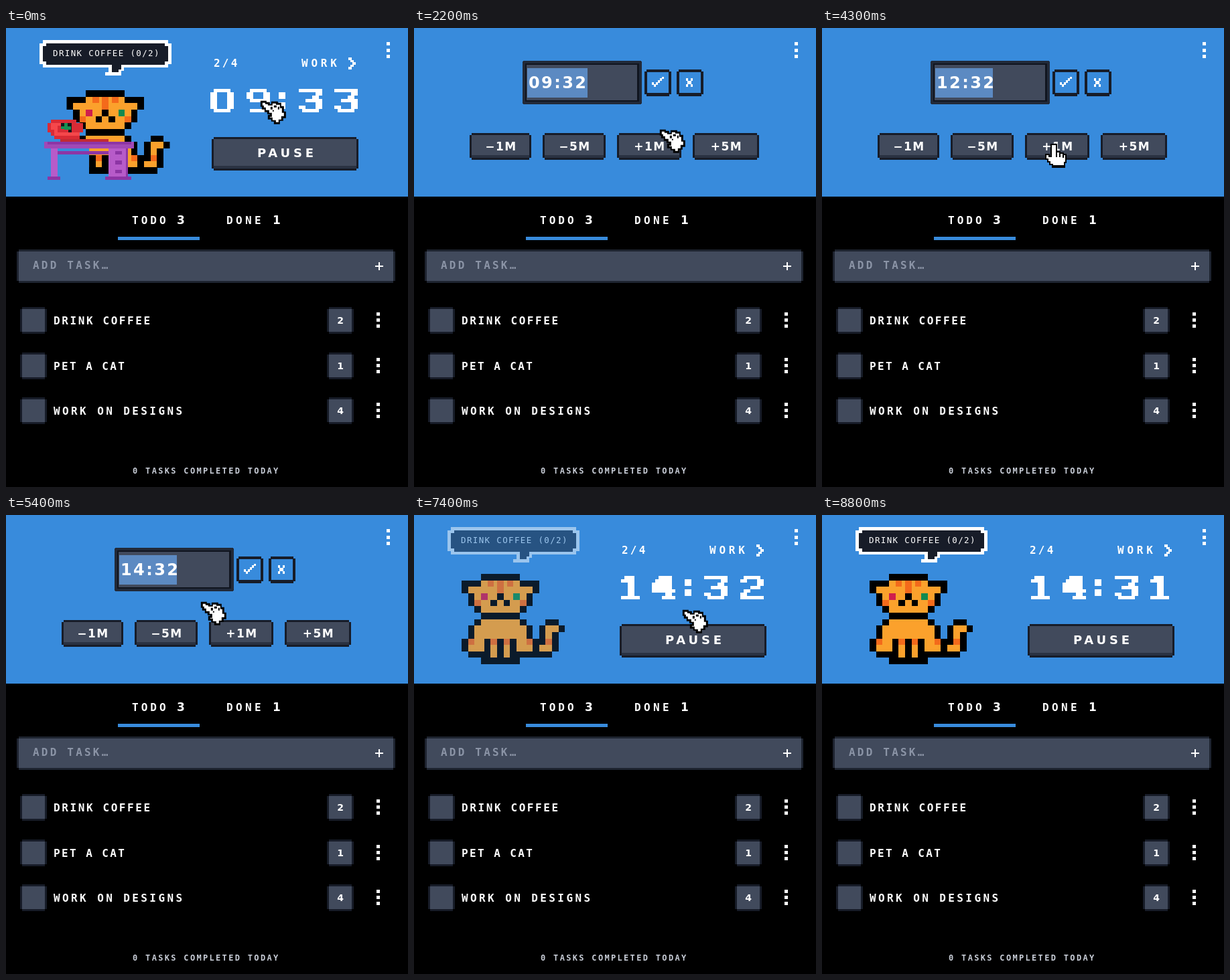
Animation, 600 px wide and 686 px high, one loop 8900 ms. Source, as an HTML page:

```html
<!DOCTYPE html>
<html lang="en">
<head>
<meta charset="utf-8">
<title>Pixel pomodoro</title>
<style>
  html, body { margin: 0; width: 100%; height: 100%; overflow: hidden; background: #000; }
  svg { display: block; width: 600px; height: 686px; }
  path, rect { shape-rendering: crispEdges; }
  text { font: bold 16px "DejaVu Sans Mono", monospace; fill: #fff; white-space: pre; }
  .wide { font-family: "DejaVu Sans", sans-serif; }
  .mid { text-anchor: middle; }

  .main, .edit, .desk, .bubble, .sit, .tip, .point, .open, .cursor {
    animation: 8900ms step-end infinite;
  }
  .main { animation-name: main; }
  .edit { animation-name: edit; }
  .desk { animation-name: desk; }
  .sit { animation-name: sit; animation-timing-function: linear; }
  .bubble { animation-name: fade; animation-timing-function: linear; }
  .tip { animation-name: tip; }
  .point { animation-name: point; }
  .open { animation-name: open; }
  .cursor { animation-name: travel; animation-timing-function: ease-in-out; }

  @keyframes main { 0%, 79.78% { visibility: visible } 7.87% { visibility: hidden } 100% { visibility: visible } }
  @keyframes edit { 0%, 79.78%, 100% { visibility: hidden } 7.87% { visibility: visible } }
  @keyframes desk { 0% { visibility: visible } 7.87%, 100% { visibility: hidden } }
  @keyframes sit { 0%, 79.78% { opacity: 0 } 84%, 100% { opacity: 1 } }
  @keyframes fade { 0%, 7.87% { opacity: 1 } 7.88%, 79.78% { opacity: 0 } 86.52%, 100% { opacity: 1 } }
  @keyframes tip { 0%, 79.78%, 100% { visibility: hidden } 73.03% { visibility: visible } }
  @keyframes point {
    0%, 56.2%, 79.78%, 100% { visibility: hidden }
    39.33%, 71.2% { visibility: visible }
  }
  @keyframes open {
    0%, 56.2%, 79.78%, 100% { visibility: visible }
    39.33%, 71.2% { visibility: hidden }
  }
  @keyframes travel {
    0% { transform: translate(381px, 111px) }
    4.49%, 7.87% { transform: translate(384px, 106px) }
    16.85% { transform: translate(400px, 150px) }
    24.72% { transform: translate(368px, 154px) }
    35.96% { transform: translate(340px, 158px) }
    39.33%, 55.06% { transform: translate(346px, 174px) }
    60.67% { transform: translate(292px, 132px) }
    68.54% { transform: translate(325px, 102px) }
    71.91%, 79.78% { transform: translate(368px, 84px) }
    83.15% { transform: translate(402px, 144px) }
    89.89% { transform: translate(545px, 176px) }
    94.38%, 100% { transform: translate(640px, 190px) }
  }
</style>
</head>
<body>
<svg viewBox="0 0 600 686">
  <defs>
    <g id="cat">
      <path d="M3 0H9V1H12V3H11V5H10V6H9V7H10V8H11V10H12V8H13V7H15V8H16V9H15V12H14V13H9V14H3V13H1V12H0V10H1V8H2V7H3V6H2V5H1V3H0V1H3Z"/>
      <path fill="#fba12c" d="M3 1H9V2H11V3H10V5H9V6H3V5H2V3H1V2H3Z"/>
      <path fill="#fba12c" d="M3 7H9V8H10V10H11V12H8V13H4V12H1V10H2V8H3Z M13 8H15V9H14V12H12V11H13Z"/>
      <path fill="#f46a1b" d="M4 1h1v1h-1z M5.5 1h1v2h-1z M7 1h1v1h-1z M2 4h1v1h-1z M9 4h1v1h-1z M1 10h1v1h-1z M4.5 10h1v1h-1z M6.5 10h1v1h-1z M10 10h1v1h-1z M13 10h1v1h-1z"/>
      <path d="M3.5 10h1v3h-1z M5.5 10h1v3h-1z M7.5 10h1v3h-1z M5.5 3h1v1h-1z M4.5 4h1v1h-1z M6.5 4h1v1h-1z"/>
      <path fill="#cf1f4d" d="M3 3h1v1h-1z"/>
      <path fill="#128a50" d="M8 3h1v1h-1z"/>
    </g>
    <clipPath id="seat"><path d="M0 0H16V12.5H3.5V8.8H0Z"/></clipPath>
  </defs>

  <rect width="600" height="252" fill="#388bdc"/>
  <g id="list"></g>

  <g class="bubble">
    <path fill="#fff" d="M55 18H242V23H247V54H242V59H176V64H172V71H148V66H153V59H55V54H50V23H55Z"/>
    <path fill="#171c28" d="M60 23H237V27H242V50H237V55H172V62H168V66H158V55H60V50H55V27H60Z"/>
    <text x="70" y="42" style="font-size:12.5px;font-weight:400;letter-spacing:1.35px">DRINK COFFEE (0/2)</text>
  </g>
  <use class="sit" href="#cat" transform="translate(71 88) scale(9.65)"/>
  <g class="desk">
    <g transform="translate(90.3 93) scale(9.65)"><use href="#cat" clip-path="url(#seat)"/></g>
    <path d="M124 208H226V218H124Z"/>
    <path fill="#d92b35" d="M67 137H105V142H115V156H110V166H72V161H67V156H62V142H67Z"/>
    <path fill="#f5474b" d="M67 142H82V146H77V156H110V161H72V152H67Z"/>
    <path fill="#15171d" d="M82 142H98V156H93V151H87V147H82Z"/>
    <path fill="#159052" d="M82 147H87V142H92V147H97V152H87V151H82Z"/>
    <path fill="#c22b33" d="M81 166H153V171H81Z"/>
    <path fill="#8d35a5" d="M77 184H155V189H77Z M62 222H81V227H62Z M148 222H187V227H148Z M177 180H182V222H177Z"/>
    <path fill="#b75bc9" d="M67 180H77V222H67Z M153 180H179V222H153Z"/>
    <path fill="#a149b6" d="M57 170H191V180H57Z"/>
    <path fill="#8d35a5" d="M62 170H187V174H62Z M163 184H173V189H163Z M163 198H173V204H163Z M163 212H173V217H163Z"/>
  </g>

  <g class="main" id="main"></g>
  <g class="edit" id="edit"></g>

  <g class="tip">
    <path fill="#fff" d="M268 116H462V120H466V124H470V156H466V160H462V164H268V160H264V156H260V124H264V120H268Z"/>
    <path fill="#171c28" d="M268 121H462V125H466V155H462V159H268V155H264V125H268Z"/>
    <text x="278" y="145" style="font-size:14px;letter-spacing:3.1px">CONFIRM CHANGES</text>
  </g>

  <g class="cursor" stroke-width="2.5">
    <g class="open" transform="translate(-3 -3) scale(1.1)">
      <path fill="#fff" stroke="#000" d="M3 2H9V4H13V6H17V3H24V5H29V9H32V16H35V23H31V27H27V31H21V28H17V25H13V21H16V18H12V15H8V11H5V8H3Z"/>
      <path d="M15 9h3v3h-3z M20 7h3v3h-3z M25 9h2v3h-2z M18 13h2v2h-2z"/>
    </g>
    <g class="point">
      <path fill="#fff" stroke="#000" d="M-4 0H4V11H9V13H14V15H18V27H16V34H-2V30H-6V26H-9V22H-12V15H-7V18H-4Z"/>
      <path d="M3 12h2v7h-2z M8 14h2v5h-2z M13 16h2v4h-2z M-2 31h18v3h-18z"/>
    </g>
  </g>
</svg>

<script>
const LOOP = 8900;
const SLATE = '#414a5c', EDGE = '#171c28', BLUE = '#388bdc';
const $ = id => document.getElementById(id);

const rect = (x, y, w, h, fill) =>
  `<rect x="${x}" y="${y}" width="${w}" height="${h}" fill="${fill}"/>`;
// Rectangle with square notches of size c cut from its corners
const box = (x, y, w, h, c, fill) => `<path fill="${fill}" d="M${x + c} ${y}h${w - 2 * c}v${c}h${c}v${h - 2 * c}
  h${-c}v${c}h${2 * c - w}v${-c}h${-c}v${2 * c - h}h${c}z"/>`;
const label = (x, y, str, size, gap = 0, cls = '', fill = '#fff') =>
  `<text x="${x}" y="${y}" class="${cls}" style="font-size:${size}px;letter-spacing:${gap}px;fill:${fill}">${str}</text>`;
const dots = (x, y, step) => [0, 1, 2].map(i => rect(x, y + i * step, 5, 5, '#fff')).join('');
const tile = (x, y) => box(x, y, 40, 40, 3, EDGE) + rect(x + 3, y + 3, 34, 34, SLATE);
const button = (x, y, w, h) => box(x, y, w, h, 3, EDGE)
  + rect(x + 3, y + 3, w - 6, h - 6, SLATE) + rect(x + 3, y + h - 7, w - 6, 4, '#2a3242');

const tasks = [['DRINK COFFEE', 2, 2.6], ['PET A CAT', 1, 2.4], ['WORK ON DESIGNS', 4, 3.4]];

$('list').innerHTML =
  dots(568, 21, 9.5)
  + label(188, 293, 'TODO', 16, 4) + label(255, 293, '3', 17, 0, 'wide')
  + label(329, 293, 'DONE', 16, 4.4) + label(398, 293, '1', 17, 0, 'wide')
  + rect(167, 312, 122, 5, BLUE)
  + box(16, 331, 565, 50, 3, '#1e2430') + rect(19, 334, 559, 44, SLATE)
  + label(40, 360, 'ADD TASK…', 16, 3.2, '', '#8b94a6')
  + rect(551, 355, 12, 2, '#fff') + rect(556, 350, 2, 12, '#fff')
  + tasks.map(([name, count, gap], i) => {
      const y = Math.round(417 + i * 67.5);
      return tile(21, y) + label(71, y + 26, name, 16, gap)
        + tile(479, y) + label(499, y + 25, count, 14, 0, 'wide mid') + dots(553, y + 8, 9);
    }).join('')
  + label(189, 666, '0 TASKS COMPLETED TODAY', 12, 2.32, '', '#c8cdd7');

$('main').innerHTML =
  label(310, 58, '2/4', 16, 3.2) + label(441, 58, 'WORK', 16, 4.8)
  + '<path fill="#fff" d="M511 44h5v4h3v3h3v4h-3v3h-3v4h-5v-4h3v-3h3v-4h-3v-3h-3z"/>'
  + button(307, 163, 219, 50) + label(375, 193, 'PAUSE', 18, 4.8, 'wide')
  + '<g id="clock" fill="#fff" fill-rule="evenodd" role="img"></g>';

const steps = [['−1M', 83, 92], ['−5M', 192, 94], ['+1M', 303, 96], ['+5M', 416, 99]];

$('edit').innerHTML =
  box(162, 49, 178, 65, 1, '#222a39') + rect(166, 53, 170, 57, '#10151f') + rect(168, 55, 165, 53, SLATE)
  + '<rect id="pick" x="169" y="60" height="44" fill="#5c8ac2"/>'
  + '<text id="field" class="wide" x="171" y="90" style="font-size:24px;letter-spacing:2.4px"></text>'
  + [344, 392].map(x => box(x, 62, 40, 40, 3, EDGE) + rect(x + 4, 66, 32, 31, BLUE)).join('')
  + '<path fill="#fff" d="M370 73h3v3h-3v3h-3v3h-3v3h-3v3h-3v-3h-3v-4h3v3h3v-3h3v-3h3v-3h3z"/>'
  + '<path fill="#fff" d="M406 75h3v4h4v-4h3v4h-2v5h2v4h-3v-4h-4v4h-3v-4h2v-5h-2z"/>'
  + steps.map(([str, x, w]) => button(x, 157, w, 40) + label(x + w / 2 + 1, 183, str, 17, 1.5, 'wide mid')).join('');

// Blocky clock figures on a seven-unit grid
const figures = {
  0: 'M1 0H6V1H7V6H6V7H1V6H0V1H1Z M2 1V6H5V1Z',
  1: 'M1 0H4V6H5.6V7H0V6H2V2H0V1H1Z',
  2: 'M1 0H6V1H7V3H6V4H3V5H2V6H7V7H0V5H1V4H3V3H5V1H2V2H0V1H1Z',
  3: 'M0 0H7V2H6V3H7V6H6V7H1V6H0V5H2V6H5V4H2V3H4V2H5V1H0Z',
  4: 'M2 0H6V4H7V5H6V6H7V7H3V6H4V5H0V2H1V1H2Z',
  9: 'M1 0H6V1H7V6H6V7H1V6H5V4H1V3H0V1H1Z M2 1V3H5V1Z',
  ':': 'M0 1H2V3H0Z M0 4H2V6H0Z'
};
const advance = ch => ch === ':' ? 24.5 : ch === '1' ? 46.5 : 53.5;

function drawClock(time) {
  const total = [...time].reduce((sum, ch) => sum + advance(ch), -18.5);
  let x = 415 - total / 2;
  $('clock').setAttribute('aria-label', time);
  $('clock').innerHTML = [...time].map(ch => {
    const left = ch === ':' ? x - 5 : x;
    x += advance(ch);
    return `<path transform="translate(${left.toFixed(1)} 91) scale(5)" d="${figures[ch]}"/>`;
  }).join('');
}

let shownClock, shownField;
function frame(now) {
  const t = now % LOOP;
  const clock = t < 300 ? '09:33' : t < 4000 ? '09:32' : t < 8100 ? '14:32' : '14:31';
  const clicks = Math.max(0, Math.min(5, Math.floor((t - 3300) / 300)));
  const field = String(9 + clicks).padStart(2, '0') + ':32';
  if (clock !== shownClock) drawClock(shownClock = clock);
  if (field !== shownField) {
    $('field').textContent = shownField = field;
    $('pick').setAttribute('width', clicks ? 86 : 90);
  }
  requestAnimationFrame(frame);
}
frame(performance.now());
</script>
</body>
</html>
```
